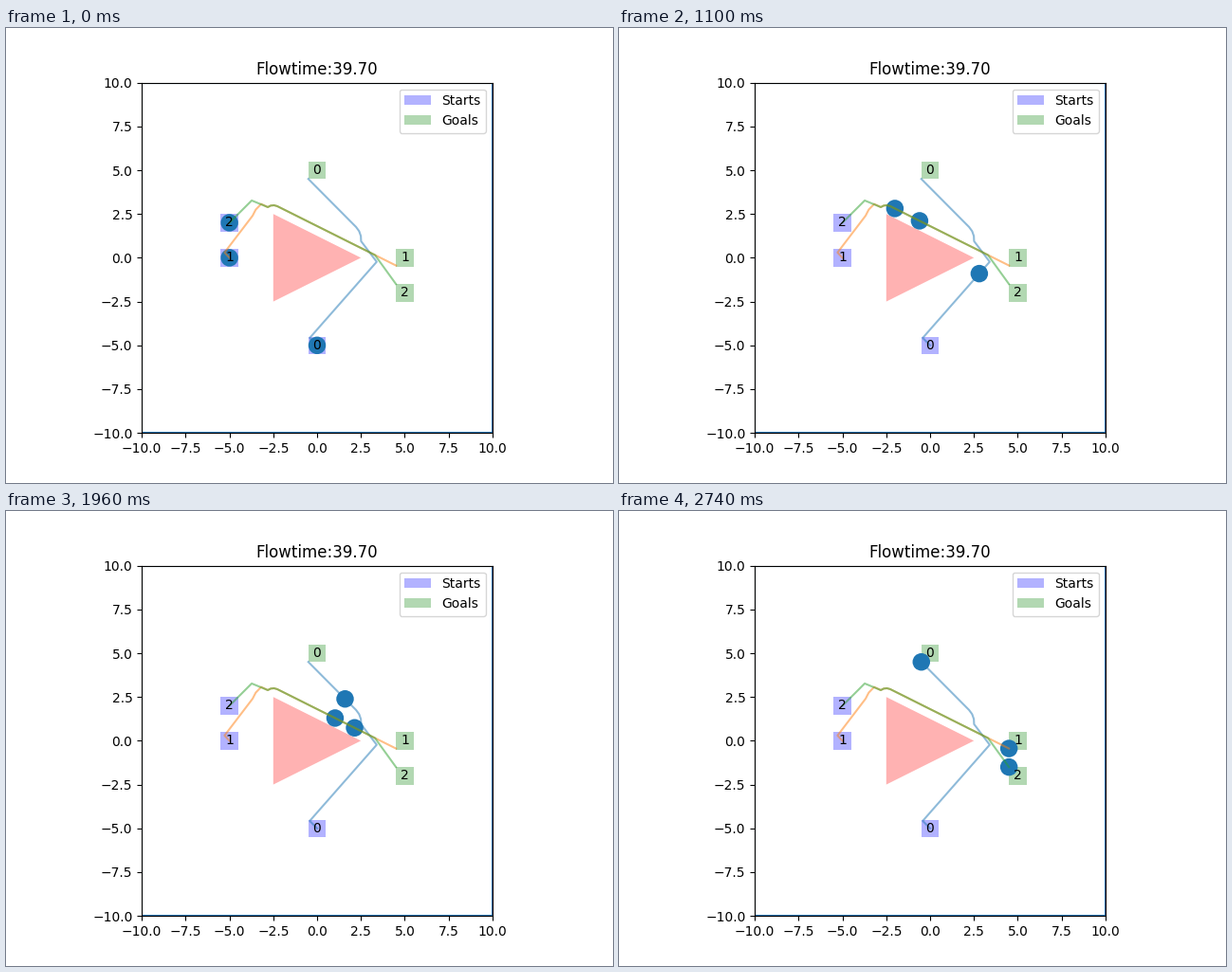
A matplotlib script for the animation above (2.76 s loop, 640x480 px).

```python
import numpy as np
import matplotlib.pyplot as plt
from matplotlib.animation import FuncAnimation
from matplotlib.patches import Circle, Polygon, Rectangle

FRAMES, INTERVAL = 138, 20
STEP = 0.1      # distance covered per frame
RADIUS = 0.5
STARTS = [(0, -5), (-5, 0), (-5, 2)]
GOALS = [(0, 5), (5, 0), (5, -2)]
OBSTACLE = [(-2.5, -2.5), (-2.5, 2.5), (2.5, 0)]


def arc(center, r, deg0, deg1, chords=3):
    """Points on a circular arc split into equal chords."""
    a = np.radians(np.linspace(deg0, deg1, chords + 1))
    return list(zip(center[0] + r * np.cos(a), center[1] + r * np.sin(a)))


def beside(x):
    """Point one radius off the obstacle's upper edge."""
    return x, 1.25 - 0.5 * x + RADIUS * np.sqrt(1.25)


def walk(points):
    """Positions per frame: each leg takes whole steps, (x, y, n) rests n frames."""
    path = [np.array(points[0][:2], float)]
    for x, y, *rest in points[1:]:
        a, b = path[-1], np.array([x, y])
        n = max(1, int(np.ceil(np.hypot(*(b - a)) / STEP - 1e-6)))
        path += [a + (b - a) * k / n for k in range(1, n + 1)]
        path += [b] * sum(rest)
    return np.array(path)


meet = beside(1.515)
around = arc(OBSTACLE[1], RADIUS, 128.5, 63.43)

ROUTES = [walk(p) for p in (
    # swings round the agent that gives way at the meeting point
    [STARTS[0], (-0.42, -4.575), (3.4, -0.23, 1)]
    + arc(meet, 2 * RADIUS, -6, 44.8) + [(-0.5, 4.5)],
    [STARTS[1], (-5.28, 0.3), (-3.68, 2.4), (-3.5, 2.75), (-3.19, 3.07)]
    + around + [(*beside(0.58), 9), beside(4.5)],
    [STARTS[2], (-3.73, 3.27, 2)]
    + around + [(*meet, 12), beside(3.3), (4.5, -1.5)],
)]


def add_cells(ax, cells, color, label):
    for i, (x, y) in enumerate(cells):
        ax.add_patch(Rectangle((x - 0.5, y - 0.5), 1, 1, facecolor=color, alpha=0.3,
                               lw=0, label=label if i == 0 else None))
        ax.text(x, y, str(i), ha="center", va="center")


plt.rcParams["text.kerning_factor"] = 6
fig, ax = plt.subplots(figsize=(6.4, 4.8), dpi=100)
ax.set_aspect("equal")
ax.set_xlim(-10, 10)
ax.set_ylim(-10, 10)
ax.set_title("Flowtime:39.70")

ax.plot([-10, 10, 10, -10, -10], [-10, -10, 10, 10, -10], color="C0")
ax.add_patch(Polygon(OBSTACLE, facecolor="red", alpha=0.3, lw=0))
add_cells(ax, STARTS, "blue", "Starts")
add_cells(ax, GOALS, "green", "Goals")
for i, route in enumerate(ROUTES):
    ax.plot(*route.T, color=f"C{i}", alpha=0.5)
ax.legend(loc="upper right")

agents = [ax.add_patch(Circle(start, RADIUS, facecolor="C0", lw=0)) for start in STARTS]


def update(frame):
    for agent, route in zip(agents, ROUTES):
        agent.center = route[min(frame, len(route) - 1)]
    return agents


anim = FuncAnimation(fig, update, frames=FRAMES, interval=INTERVAL,
                     repeat=True, repeat_delay=0)
plt.show()
```
